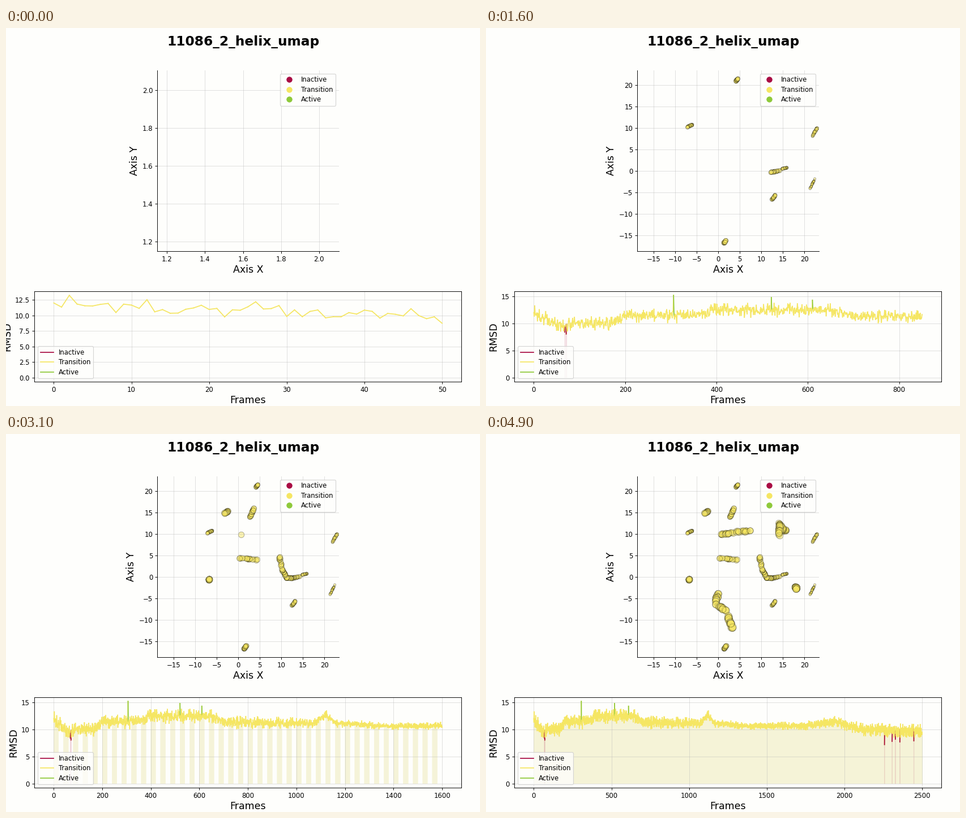
Animation, 837 px wide and 669 px high, one loop 5 s. Source, as a matplotlib script:

```python
import numpy as np
import matplotlib.pyplot as plt
from matplotlib.animation import FuncAnimation
from matplotlib.collections import LineCollection, PolyCollection
from matplotlib.lines import Line2D

W, H, DPI = 837, 669, 83.7
STEP, FRAMES = 50, 50
TOTAL = STEP * FRAMES
THIN = 5  # one point of the cloud for every few steps of the curve
PAPER = "#fefefc"
RED, YELLOW, GREEN = "#a90c43", "#f5e663", "#8fc93a"
STATES = {"Inactive": RED, "Transition": YELLOW, "Active": GREEN}

plt.rcParams.update({"figure.facecolor": PAPER, "axes.facecolor": PAPER,
                     "legend.labelspacing": .37, "xtick.major.pad": 3})
rng = np.random.default_rng(11086)
index = np.arange(TOTAL + 1)

# RMSD: a slow trend, noise that calms down midway, and a few extremes
TREND = [(0, 11.8), (70, 9.3), (90, 10.2), (172, 10.1), (200, 11.6),
         (340, 11.4), (400, 12.4), (650, 12.5), (700, 11.3), (1080, 11.2),
         (1120, 12.8), (1160, 11.2), (1400, 10.6), (1750, 10.7),
         (1930, 11.5), (2120, 10), (2500, 9.6)]
EXTREMES = {2: 13.25, 68: 8.4, 71: 8.05, 306: 15.2, 520: 14.8, 610: 14.3,
            2258: 7.2, 2307: 7.8, 2328: 8.2, 2357: 7.7, 2447: 7.9}

spread = .58 - .32 * np.exp(-((index - 1450) / 600) ** 2)
noise = np.clip(rng.normal(size=TOTAL + 1), -2.3, 2.3)
rmsd = np.interp(index, *zip(*TREND)) + spread * noise
rmsd = np.clip(rmsd, 8.6, np.where(index < 300, 13.1, 13.9))
for i, value in EXTREMES.items():
    rmsd[i] = value
colors = np.where(rmsd > 14, GREEN, np.where(rmsd < 8.5, RED, YELLOW))
segments = np.stack([np.column_stack([index[:-1], rmsd[:-1]]),
                     np.column_stack([index[1:], rmsd[1:]])], axis=1)

# Embedding: each stretch of equal length drifts from one place to another
DRIFTS = np.array([
    (25 + 1.193j, 25 + 2.93j), (22.4 - 1.9j, 21.3 - 4j),
    (15.9 + .7j, 14.9 + .5j), (21.8 + 8.1j, 22.9 + 9.9j),
    (-6.1 + 10.7j, -7.1 + 10.2j), (12.5 - 6.6j, 13.2 - 5.7j),
    (4.1 + 20.8j, 4.5 + 21.4j), (14.2 + 0j, 12.2 - .3j),
    (1.4 - 16.7j, 1.9 - 16j), (12.5 - .3j, 11.2 - .2j),
    (11.2 - .2j, 10.5 + 1.2j), (2.8 + 14j, 3.6 + 15.8j),
    (10.2 + 1.5j, 9.6 + 4.6j), (4.4 + 3.9j, .3 + 4.4j),
    (-2.4 + 15.2j, -3.1 + 14.8j), (-6.7 - .65j, -6.7 - .65j),
    (.8 + 9.9j, 3.6 + 10.2j), (4.2 + 10.5j, 7.4 + 10.6j),
    (14.3 + 10.5j, 15.6 + 10.8j), (15 + 11j, 14.2 + 12.4j),
    (14.2 + 11.8j, 14.2 + 9.7j), (18 - 2.4j, 18.1 - 2.7j),
    (0 - 4.1j, -.7 - 5.8j), (-.4 - 6.3j, 1.8 - 8j), (2.2 - 9j, 3.2 - 11.7j)])

length = TOTAL // len(DRIFTS)
stretch = np.minimum(index // length, len(DRIFTS) - 1)
loose = stretch > 0
t = index / length - stretch + loose * rng.uniform(-.4, .4, TOTAL + 1)
start, end = DRIFTS[stretch].T
angle = rng.uniform(0, 2 * np.pi, TOTAL + 1)
places = (start + (end - start) * np.clip(t, 0, 1)
          + loose * (.06 + .12 * index / TOTAL) * np.exp(1j * angle))
points = np.column_stack([places.real, places.imag])[::THIN]
sizes = (8 + .045 * index)[::THIN]


def slivers(picked):
    """Quads from the curve down to zero for the picked segments."""
    return [[(i, 0), (i, rmsd[i]), (i + 1, rmsd[i + 1]), (i + 1, 0)]
            for i in picked]


def padded(low, high):
    pad = .05 * (high - low)
    return low - pad, high + pad


fig = plt.figure(figsize=((W + .001) / DPI, (H + .001) / DPI), dpi=DPI)
fig.suptitle("11086_2_helix_umap", fontsize=20, fontweight="bold")


def add_axes(left, top, right, bottom, xlabel, ylabel):
    ax = fig.add_axes([left / W, 1 - bottom / H,
                       (right - left) / W, (bottom - top) / H])
    ax.set_xlabel(xlabel, fontsize=15, labelpad=3)
    ax.set_ylabel(ylabel, fontsize=15)
    ax.grid(alpha=.4)
    return ax


def add_legend(ax, loc, **style):
    ax.legend(handles=[Line2D([0], [0], label=name,
                              **{"color": c, "markerfacecolor": c, **style})
                       for name, c in STATES.items()], loc=loc)


umap_ax = add_axes(267.4, 75, 588, 395.4, "Axis X", "Axis Y")
umap_ax.spines[["top", "right"]].set_visible(False)
add_legend(umap_ax, "upper right", color="w", marker="o", markersize=10)
cloud = umap_ax.scatter([], [], c=YELLOW, edgecolors="black", linewidths=.5,
                        alpha=.5)

rmsd_ax = add_axes(50.1, 465.8, 804.3, 626.1, "Frames", "RMSD")
add_legend(rmsd_ax, "lower left")
shade = PolyCollection([], facecolor="#f5f3d7", linewidth=0, antialiased=False)
dips = PolyCollection([], facecolor=RED, edgecolor=RED, linewidth=1, alpha=.1)
curve = LineCollection([], linewidths=1.5, capstyle="projecting", zorder=2)
for artist in (shade, dips, curve):
    rmsd_ax.add_collection(artist, autolim=False)


def update(frame):
    n = STEP * (frame + 1)
    shown = n // THIN + 1
    cloud.set_offsets(points[:shown])
    cloud.set_sizes(sizes[:shown], DPI)
    limits = padded(points[:shown, 1].min(), points[:shown, 1].max())
    umap_ax.set(xlim=limits, ylim=limits)

    curve.set_segments(segments[:n])
    curve.set_color(colors[:n])
    # The shading closes up from pale vertical bands to a solid area.
    cover = np.clip((n - 1300) / 600, 0, 1)
    phase = (index[:n] / n * 40) % 1
    shade.set_verts(slivers(np.flatnonzero(phase < cover)))
    shade.set_alpha(.2 + .8 * cover)
    dips.set_verts(slivers(np.flatnonzero(colors[:n] == RED)))
    rmsd_ax.set(xlim=padded(0, n), ylim=padded(0, rmsd[:n + 1].max()))
    return cloud, curve, shade, dips


animation = FuncAnimation(fig, update, frames=FRAMES, interval=100,
                          repeat=True, repeat_delay=0)
plt.show()
```
